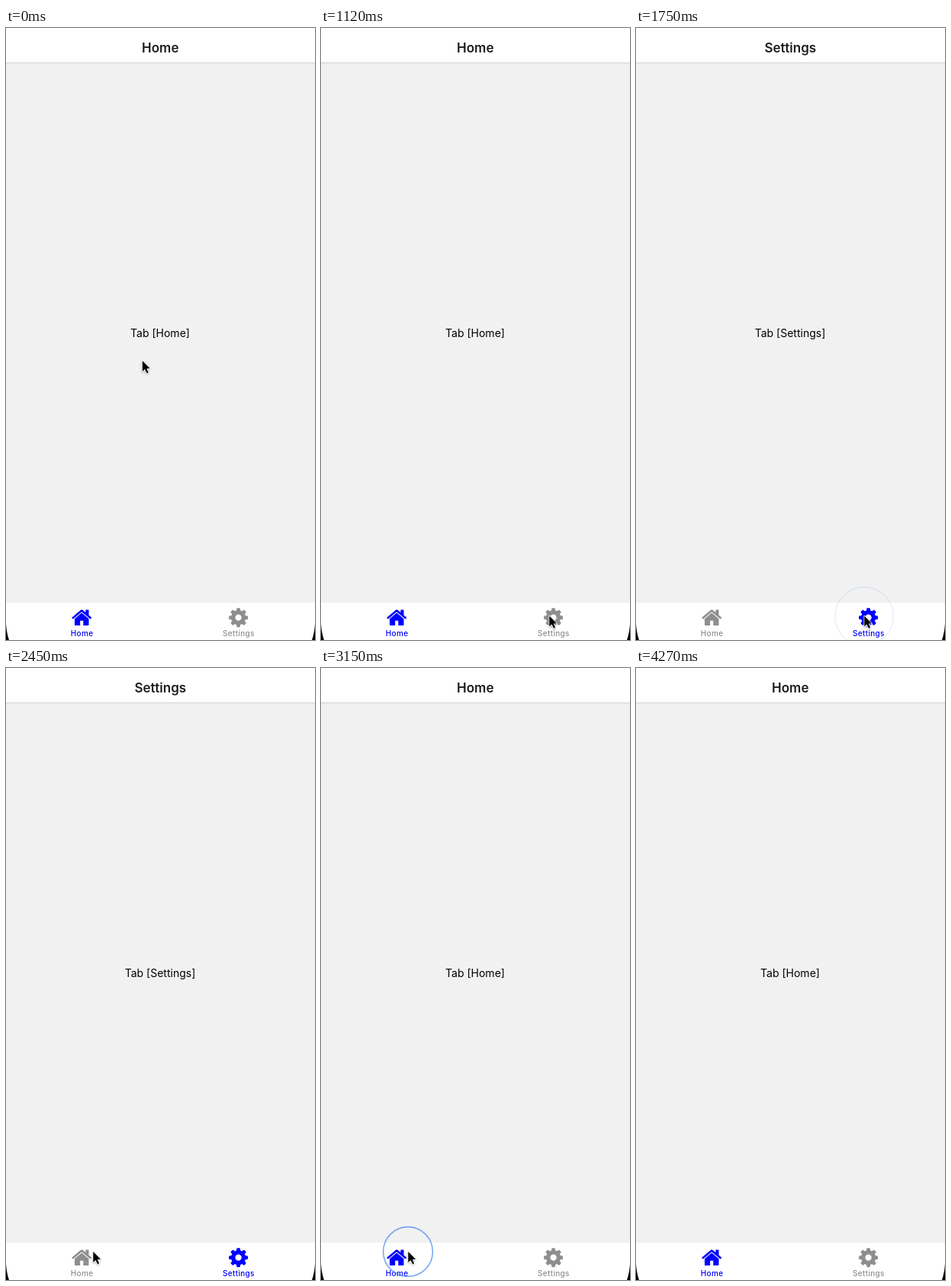
These frames come from a looping animation (405x800 px, 4.76 s). An HTML page:

```html
<!DOCTYPE html>
<html lang="en">
<head>
<meta charset="utf-8">
<title>Tab navigation</title>
<style>
  html, body { margin: 0; width: 100%; height: 100%; overflow: hidden; background: #f1f1f1; }
  svg { display: block; width: 405px; height: 800px; }
  text { font-family: Inter, sans-serif; text-anchor: middle; }
  #title { font-size: 17px; font-weight: 600; fill: #1c1c1e; }
  #content { font-size: 14px; }
  .tab { color: #8e8e8f; fill: currentColor; }
  .tab.active { color: #00f; }
  .tab text { font-size: 10px; font-weight: 500; letter-spacing: .33px; }
  #cursor { filter: drop-shadow(0 1px 1px rgba(0, 0, 0, .3)); }
</style>
</head>
<body>
<svg viewBox="0 0 405 800">
  <defs>
    <path id="tooth" d="M-165-520L-135-740Q-130-768-105-768H105Q130-768 135-740L165-520Z"/>
  </defs>
  <rect width="405" height="800" fill="#f1f1f1"/>
  <rect width="405" height="45.5" fill="#fff"/>
  <rect y="45.2" width="405" height="1" fill="#d0d0d0"/>
  <rect y="751.5" width="405" height="48.5" fill="#fff"/>
  <text id="title" x="202.3" y="32.3"></text>
  <text id="content" x="202" y="403.6"></text>

  <g class="tab" id="home">
    <path transform="translate(84.8 756.3) scale(.0161)" d="M1472 992v480q0 26-19 45t-45 19h-384v-384h-256v384h-384q-26 0-45-19t-19-45v-480q0-1 .5-3t.5-3l575-474 575 474q1 2 1 6zm223-69l-62 74q-8 9-21 11h-3q-13 0-21-7l-692-577-692 577q-12 8-24 7-13-2-21-11l-62-74q-8-10-7-23.5t11-21.5l719-599q32-26 76-26t76 26l244 204v-195q0-14 9-23t23-9h192q14 0 23 9t9 23v408l219 182q10 8 11 21.5t-7 23.5z"/>
    <text x="99.6" y="795">Home</text>
  </g>
  <g class="tab" id="settings">
    <g id="gear" transform="translate(304.6 770.7) scale(.0162)">
      <circle r="425" fill="none" stroke="currentColor" stroke-width="340"/>
    </g>
    <text x="304.9" y="795">Settings</text>
  </g>

  <path d="M0 779Q.8 791 4 800H0ZM405 779Q404.2 791 401 800H405Z"/>
  <circle id="ring" fill="none" stroke="#2f7bf0"/>
  <path id="cursor" d="M.3.5V14.6L3.5 11.6 6 16.8 8.2 15.8 5.8 10.7 10 10.3Z" stroke="#fff" stroke-width="1.6" stroke-linejoin="round" paint-order="stroke"/>
</svg>
<script>
  const LOOP = 4760, STEP = 70, RING_TIME = 450;
  const $ = id => document.getElementById(id);

  const clicks = [
    { at: 1400, x: 299, y: 769 },
    { at: 2940, x: 114, y: 763 },
  ];
  const start = [178.5, 434.5];
  const moves = [
    { from: 420, to: 892, end: [299, 768] },
    { from: 1890, to: 2170, end: [149, 755] },
    { from: 2240, to: 2450, end: [114, 762.5] },
    { from: 3430, to: 4060, end: [188, -24] },
  ];

  for (let i = 0; i < 8; i++) {
    const tooth = document.createElementNS("http://www.w3.org/2000/svg", "use");
    tooth.setAttribute("href", "#tooth");
    tooth.setAttribute("transform", `rotate(${i * 45})`);
    $("gear").append(tooth);
  }

  const set = (id, attrs) => {
    for (const name in attrs) $(id).setAttribute(name, attrs[name]);
  };
  const ease = p => p < .5 ? 2 * p * p : 1 - 2 * (1 - p) ** 2;

  function cursorAt(t) {
    let pos = start;
    for (const { from, to, end } of moves) {
      if (t <= from) break;
      const p = ease(Math.min(1, (t - from) / (to - from)));
      pos = pos.map((v, i) => v + (end[i] - v) * p);
    }
    return pos;
  }

  function draw(t) {
    const onSettings = t >= clicks[0].at && t < clicks[1].at;
    const name = onSettings ? "Settings" : "Home";
    $("title").textContent = name;
    $("content").textContent = `Tab [${name}]`;
    $("home").classList.toggle("active", !onSettings);
    $("settings").classList.toggle("active", onSettings);

    const click = clicks.find(c => t >= c.at && t < c.at + RING_TIME);
    if (click) {
      const u = (t - click.at) / RING_TIME;
      set("ring", {
        cx: click.x, cy: click.y,
        r: 14.5 + 25 * (1 - (1 - u) ** 2),
        "stroke-width": 4.3 * (1 - u) ** 1.6,
        "stroke-opacity": .08 + .57 * Math.sin(Math.PI * u),
      });
    }
    set("ring", { visibility: click ? "visible" : "hidden" });
    set("cursor", { transform: `translate(${cursorAt(t)})` });
  }

  const origin = performance.now();
  function tick() {
    const t = (performance.now() - origin) % LOOP;
    draw(Math.floor(t / STEP) * STEP);
    requestAnimationFrame(tick);
  }
  tick();
</script>
</body>
</html>
```
